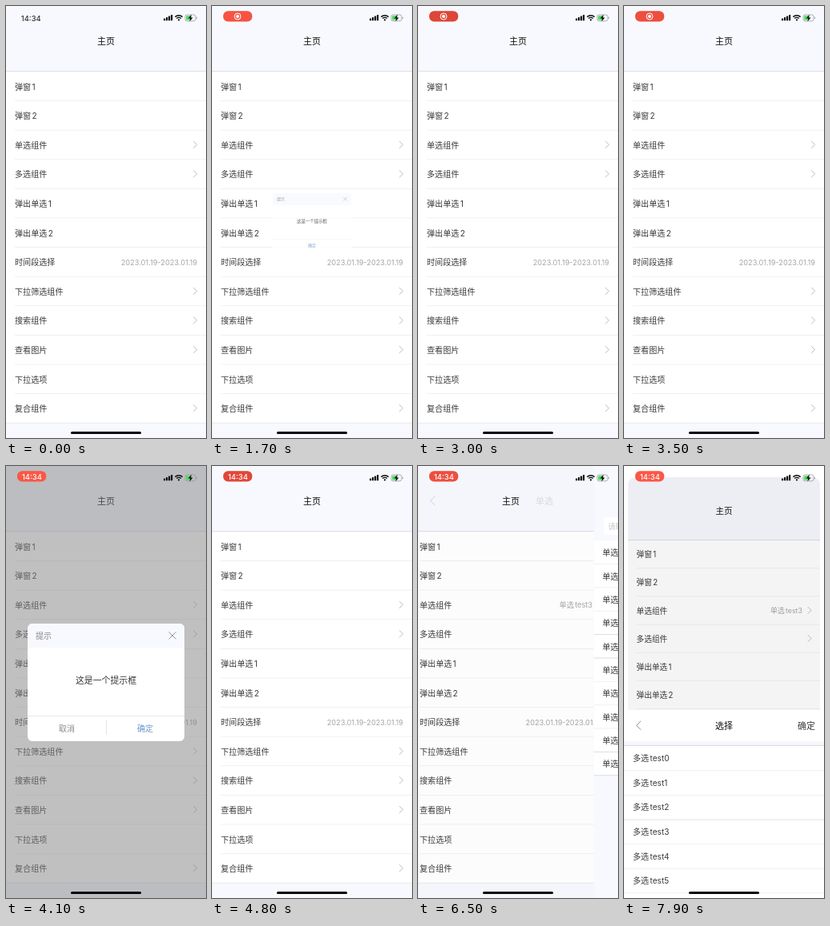
Recreate the animation shown at these times as an HTML page. Size 250 px wide and 540 px high, loop 8 s.

```html
<!DOCTYPE html>
<html lang="zh-CN">
<head>
<meta charset="utf-8">
<title>组件演示</title>
<style>
html, body { margin: 0; width: 100%; height: 100%; overflow: hidden; background: #fff; }
svg { display: block; width: 100vw; height: 100vh; }
text { font-family: Inter, "Noto Sans CJK SC", "Noto Sans CJK", sans-serif; }
</style>
</head>
<body>
<svg id="stage" viewBox="0 0 250 540"></svg>
<script>
const LOOP = 8000, STEP = 100;
const W = 250, H = 540;
const BG = '#f8f9fe', INK = '#3a3a3a', GREY = '#a6a6a8', BLUE = '#6c97cb';

const stage = document.getElementById('stage');

function add(parent, tag, attrs, content) {
  const el = document.createElementNS('http://www.w3.org/2000/svg', tag);
  set(el, attrs || {});
  if (content !== undefined) el.textContent = content;
  parent.appendChild(el);
  return el;
}
function set(el, attrs) {
  for (const k in attrs) el.setAttribute(k, attrs[k]);
}
const group = (parent, attrs) => add(parent, 'g', attrs);
const rect = (parent, x, y, width, height, fill, rx = 0) =>
  add(parent, 'rect', { x, y, width, height, fill, rx });
const path = (parent, d, stroke, width = 1) =>
  add(parent, 'path', { d, stroke, 'stroke-width': width, fill: 'none' });
const show = (el, on) => el.setAttribute('display', on ? 'inline' : 'none');

// Text centred vertically on y; a Latin tail gets a small gap after the CJK part.
function label(parent, x, y, text, { size = 10.1, fill = INK, anchor = 'start', weight = 400 } = {}) {
  const el = add(parent, 'text', {
    x, y: y + size * 0.39, fill, 'font-size': size, 'font-weight': weight, 'text-anchor': anchor
  });
  const [, head, tail] = text.match(/^([^\x00-\x7f]*)(.*)$/);
  if (head) add(el, 'tspan', {}, head);
  if (tail) add(el, 'tspan', head ? { dx: 1.3 } : {}, tail);
  return el;
}
const title = (parent, y, text) =>
  label(parent, 125, y, text, { size: 11, fill: '#111', anchor: 'middle', weight: 500 });

function buildHome() {
  const clip = add(add(stage, 'clipPath', { id: 'card' }), 'rect', { width: W, height: H });
  const g = group(stage, { 'clip-path': 'url(#card)' });
  const names = ['弹窗1', '弹窗2', '单选组件', '多选组件', '弹出单选1', '弹出单选2',
    '时间段选择', '下拉筛选组件', '搜索组件', '查看图片', '下拉选项', '复合组件'];
  const linked = [2, 3, 7, 8, 9, 11];
  const top = 82, row = 36.6;
  rect(g, 0, 0, W, H, BG);
  rect(g, 0, top, W, row * names.length, '#fff');
  rect(g, 0, 81.3, W, 0.9, '#d9dade');
  title(g, 44, '主页');
  names.forEach((name, i) => {
    const y = top + row * (i + 0.5);
    label(g, 11, y + 0.3, name);
    if (i < names.length - 1) rect(g, 11, top + row * (i + 1) - 0.4, W - 11, 0.7, '#ebebed');
    if (linked.includes(i)) path(g, `M234.2 ${y - 4.6}l4.4 4.4l-4.4 4.4`, '#bcbcbe');
  });
  rect(g, 0, top + row * names.length - 0.4, W, 0.8, '#e3e4e8');
  const value = { size: 9.2, fill: GREY, anchor: 'end' };
  label(g, 239, top + row * 6.5 + 0.3, '2023.01.19-2023.01.19', value);
  const choice = label(g, 227, top + row * 2.5 + 0.3, '单选test3', value);
  const shade = rect(g, 0, 0, W, H, '#000');
  return { g, clip, choice, shade };
}

function buildPage() {
  const g = group(stage);
  rect(g, 0, 0, W, H, BG);
  rect(g, 12.5, 64, 223.5, 22, '#fff', 4);
  label(g, 17.6, 75, '请输入区域', { size: 9.4, fill: '#c6c6ca' });
  const top = 93.3, row = 29.35;
  rect(g, 0, top, W, row * 10, '#fff');
  for (let i = 0; i < 10; i++) {
    label(g, 10.7, top + row * (i + 0.5) + 0.4, '单选test' + i);
    rect(g, 0, top + row * (i + 1) - 0.5, W, 0.9, [3, 4, 8, 9].includes(i) ? '#d9dadd' : '#efeff1');
  }
  const nav = group(stage);
  path(nav, 'M21.3 37.6l-5.8 5.8l5.8 5.8', '#222', 1.1);
  const heading = title(nav, 44, '单选');
  return { g, nav, heading };
}

function buildDialog() {
  const g = group(stage);
  rect(g, 27, 197, 196, 147, '#fff', 6);
  add(g, 'path', { d: 'M27 227v-24a6 6 0 0 1 6-6h184a6 6 0 0 1 6 6v24z', fill: BG });
  label(g, 37, 212.3, '提示', { fill: '#88888c' });
  path(g, 'M203.5 207.4l9 9m0-9l-9 9', '#88888c', 0.9);
  label(g, 125, 267.7, '这是一个提示框', { size: 10.9, anchor: 'middle' });
  rect(g, 27, 312, 196, 0.8, '#e3e3e6');
  const button = (parent, x, text, fill) => label(parent, x, 328, text, { fill, anchor: 'middle' });
  const single = group(g), pair = group(g);
  button(single, 125, '确定', BLUE);
  button(pair, 76, '取消', '#88888c');
  button(pair, 174, '确定', BLUE);
  rect(pair, 125, 318, 0.8, 18, '#dddde0');
  return { g, single, pair };
}

function buildSheet() {
  const g = group(stage);
  rect(g, 0, 305, W, 235, '#fff');
  rect(g, 0, 344.5, W, 4.5, '#f5f6fb');
  rect(g, 0, 349, W, 0.9, '#d6d7da');
  path(g, 'M21 318.8l-5.4 5.4l5.4 5.4', '#777', 0.9);
  title(g, 324.3, '选择');
  label(g, 239, 324.3, '确定', { size: 11, anchor: 'end' });
  for (let i = 0; i < 6; i++) {
    const y = 365.2 + 30.6 * i;
    label(g, 11, y, '多选test' + i);
    rect(g, 0, y + 15.2, W, 0.8, i === 2 ? '#d9dadd' : '#ececef');
  }
  return g;
}

function buildStatus() {
  const g = group(stage);
  const clock = (x, y, fill) =>
    label(g, x, y, '14:34', { size: 9.4, fill, anchor: 'middle', weight: 500 });
  const plain = clock(31.3, 15, '#333');
  const pill = rect(g, 14, 6.3, 36.3, 13.2, '#f95646', 6.2);
  const time = clock(32.4, 12.9, '#fff');
  const rec = group(g);
  add(rec, 'circle', { cx: 32, cy: 13, r: 4, fill: 'none', stroke: '#fff', 'stroke-width': 1 });
  add(rec, 'circle', { cx: 32, cy: 13, r: 2.1, fill: '#fff' });

  for (let i = 0; i < 4; i++) rect(g, 197 + i * 3, 15.4 - i * 1.5, 2.2, 2.8 + i * 1.5, '#111', 0.5);
  path(g, 'M211.4 13.6a6.6 6.6 0 0 1 9.2 0', '#111', 1.5);
  path(g, 'M213.2 15.6a4 4 0 0 1 5.6 0', '#111', 1.4);
  add(g, 'circle', { cx: 216, cy: 17.4, r: 1.1, fill: '#111' });
  set(rect(g, 224, 11, 13, 7.8, 'none', 2.3), { stroke: '#9a9a9e', 'stroke-width': 0.8 });
  rect(g, 225.2, 12.2, 6.5, 5.4, '#4cd964', 1.2);
  rect(g, 237.9, 13.6, 0.9, 2.6, '#9a9a9e', 0.4);
  add(g, 'path', { d: 'M231.8 10.4l-4 5h2.5l-1 4.2l4.3-5.2h-2.6z', fill: '#111' });
  rect(g, 81, 532, 88, 3, '#050505', 1.5);
  return { plain, pill, time, rec };
}

const home = buildHome();
const page = buildPage();
const dim = rect(stage, 0, 0, W, H, '#828283');
const dialog = buildDialog();
const sheet = buildSheet();
const status = buildStatus();

const clamp = v => Math.min(1, Math.max(0, v));
const easeOut = v => 1 - (1 - clamp(v)) ** 3;

// Critically damped spring from 0 to 1.
function spring(ms) {
  const k = 18.26 * Math.max(0, ms) / 1000;
  return 1 - (1 + k) * Math.exp(-k);
}

const DIALOGS = [
  { open: 1700, close: 2700, single: true },
  { open: 3600, close: 4500, single: false }
];
const PUSH = 5300, POP = 6300, PRESENT = 7900;

function drawDialog(t) {
  const d = DIALOGS.find(d => t >= d.open && t < d.close + 250);
  show(dialog.g, d);
  show(dim, d);
  if (!d) return;
  const grow = easeOut((t - d.open) / 350);
  const fade = 1 - clamp((t - d.close) / 250);
  const s = 0.5 + 0.5 * grow;
  set(dialog.g, {
    transform: `translate(125 270.5) scale(${s}) translate(-125 -270.5)`,
    opacity: (0.8 + 0.2 * grow) * fade
  });
  dim.setAttribute('opacity', 0.5 * grow * fade);
  show(dialog.single, d.single);
  show(dialog.pair, !d.single);
}

function drawPages(t) {
  const p = t < POP ? spring(t - PUSH) : 1 - spring(t - POP);
  const presenting = t >= PRESENT;
  const off = W * (1 - p);
  const pushed = p > 0.002;
  show(page.g, pushed);
  show(page.nav, pushed);
  page.g.setAttribute('transform', `translate(${off} 0)`);
  page.nav.setAttribute('opacity', p);
  page.heading.setAttribute('transform', `translate(${off * 0.15} 0)`);
  home.g.setAttribute('transform', presenting ? 'translate(5 14) scale(.96)'
    : `translate(${pushed ? -75 * p : 0} 0)`);
  home.clip.setAttribute('rx', presenting ? 10 : 0);
  home.shade.setAttribute('opacity', presenting ? 0.045 : 0.085 * p);
  show(home.choice, t >= POP);
  show(sheet, presenting);
}

function drawStatus(t) {
  const recording = t >= 500;
  const icon = recording && t < 3600;
  show(status.plain, !recording);
  show(status.pill, recording);
  show(status.rec, icon);
  show(status.time, recording && !icon);
  const glow = 0.5 - 0.5 * Math.cos(Math.PI * (t - 3000) / 1000);
  const mix = (a, b) => Math.round(a + (b - a) * glow);
  status.pill.setAttribute('fill', `rgb(${mix(222, 252)},${mix(70, 87)},${mix(56, 70)})`);
}

function draw(ms) {
  const t = Math.floor((ms % LOOP) / STEP) * STEP;
  drawPages(t);
  drawDialog(t);
  drawStatus(t);
}

const start = performance.now();
function tick() {
  draw(performance.now() - start);
  requestAnimationFrame(tick);
}
tick();
</script>
</body>
</html>
```
